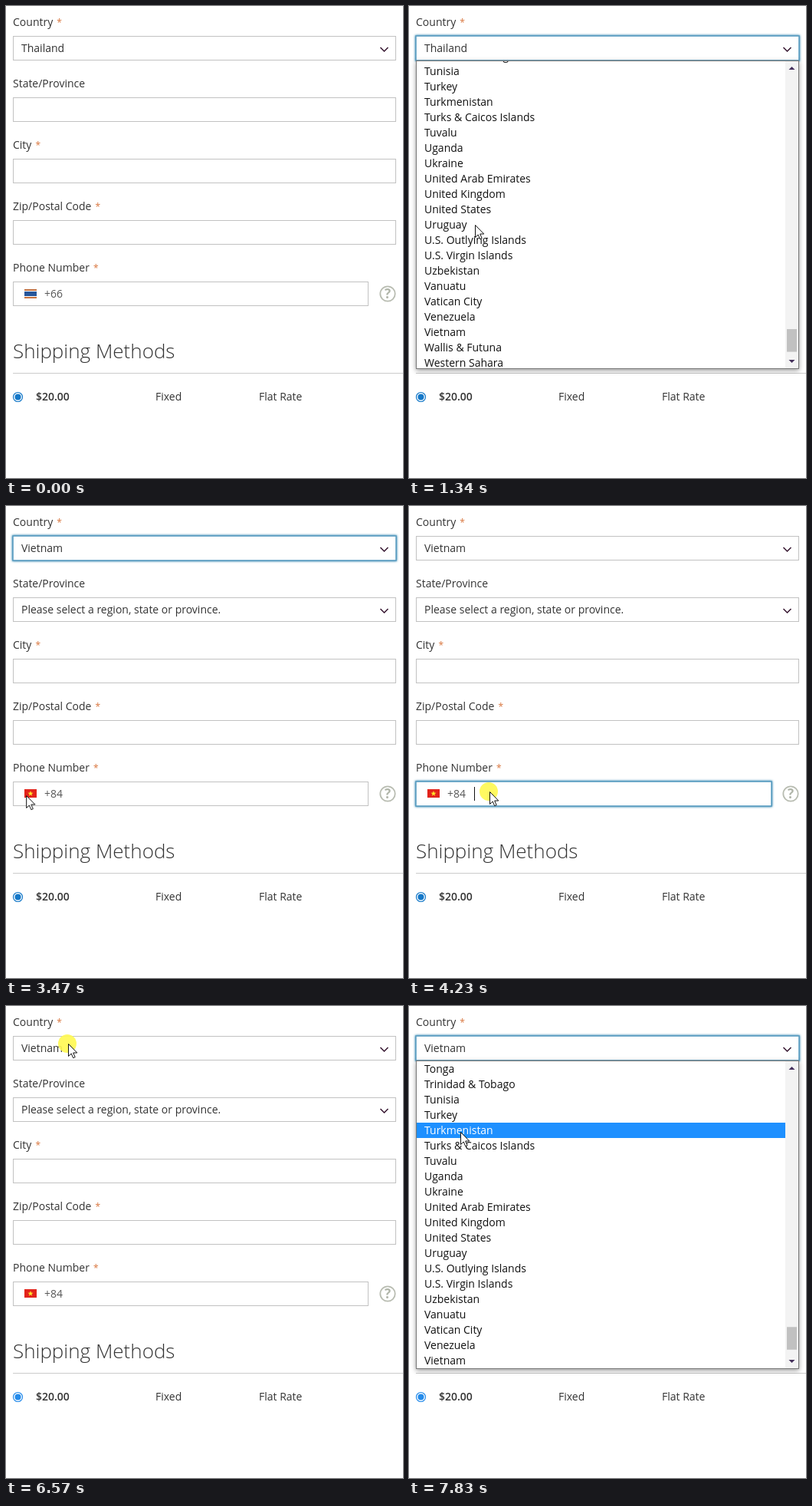
Recreate the animation shown at these times as an HTML page. Size 518 by 615 pixels, loop 8000 ms.

```html
<!DOCTYPE html>
<html lang="en">
<head>
<meta charset="utf-8">
<title>Shipping address form</title>
<style>
@property --scroll { syntax: "<number>"; inherits: true; initial-value: 0; }
@property --row { syntax: "<integer>"; inherits: true; initial-value: 19; }

html, body { margin: 0; width: 100%; height: 100%; overflow: hidden; background: #fff; }
svg { display: block; }
text { font: 14px "Open Sans", "Noto Sans", sans-serif; fill: #333; white-space: pre; }
.star { font-size: 12px; fill: #d9763f; }
.field { fill: #fff; stroke: #c2c2c2; }
.chevron { fill: none; stroke: #35152f; stroke-width: 1.5; }
.focus { fill: #fff; stroke: #5b9dc1; stroke-width: 1.6; filter: drop-shadow(0 0 1.5px #00699d); }
.dial { fill: #575757; }
.title { font-size: 26px; font-weight: 300; }
.price { font-weight: 600; }

.step { animation: 8s step-end infinite; }
.before { animation-name: before; }
.after { animation-name: after; }
.thai { animation-name: thai; }
.viet { animation-name: viet; }
.country-focus { animation-name: country-focus; }
.phone-focus { animation-name: phone-focus; }
.autofill { animation-name: autofill; }
.dot { animation-name: dot; fill: #fff94f; opacity: 0; mix-blend-mode: multiply; }
.radio { animation-name: radio; color: #1478c8; }
.caret { animation: blink 1s step-end infinite; }

.dropdown { animation: dropdown 8s step-end infinite, hover 8s step-end infinite, scroll 8s linear infinite; }
.list { transform: translateY(calc(var(--scroll) * -1px)); }
.thumb { fill: #c1c1c1; transform: translateY(calc(var(--scroll) * .0745px)); }
.bar { transform: translateY(calc(var(--row) * 20px)); }
.bar-text { transform: translateY(calc(var(--row) * -20px)); }
.list text { fill: #111; }
.list .bar-text text { fill: #fff; }
.panel { fill: #fff; stroke: #777; filter: drop-shadow(0 2px 3px #0006); }

.sheet { fill: #fff; stroke: #d4d4d4; filter: drop-shadow(0 1px 2px #0004); }
.autofill text { font-size: 11.2px; fill: #26282c; }
.autofill .number { font-size: 12.5px; font-weight: 600; }
.autofill .manage { font-size: 12.2px; }

.cursor { animation: move 8s linear infinite, appear 8s step-end infinite; }
.cursor path { fill: #fff; stroke: #111; stroke-linejoin: round; }

@keyframes before { 0% { opacity: 1 } 27.75%, 100% { opacity: 0 } }
@keyframes after { 0% { opacity: 0 } 27.75%, 100% { opacity: 1 } }
@keyframes thai { 0% { opacity: 1 } 28.75%, 100% { opacity: 0 } }
@keyframes viet { 0% { opacity: 0 } 28.75%, 100% { opacity: 1 } }
@keyframes country-focus { 0% { opacity: 0 } 10.25% { opacity: 1 } 51.9% { opacity: 0 } 83.125%, 100% { opacity: 1 } }
@keyframes phone-focus { 0% { opacity: 0 } 51.9% { opacity: 1 } 68.75%, 100% { opacity: 0 } }
@keyframes autofill { 0% { opacity: 0 } 53% { opacity: 1 } 68.75%, 100% { opacity: 0 } }
@keyframes dropdown { 0% { opacity: 0 } 10.25% { opacity: 1 } 27.75% { opacity: 0 } 83.125%, 100% { opacity: 1 } }
@keyframes radio { 53%, 100% { color: #258bea } }
@keyframes blink { 0% { opacity: 0 } 15% { opacity: 1 } 65%, 100% { opacity: 0 } }
@keyframes appear { 0% { opacity: 0 } .875%, 100% { opacity: 1 } }
@keyframes dot {
  0% { opacity: 0 } 9.125% { opacity: .9 } 11.25% { opacity: 0 }
  50.875% { opacity: .9 } 53% { opacity: 0 }
  66.625% { opacity: .9 } 68.75% { opacity: 0 }
  82.125% { opacity: .9 } 84.25%, 100% { opacity: 0 }
}
@keyframes scroll {
  0%, 14.5% { --scroll: 0 }
  16.75% { --scroll: 497 }
  18.75%, 50% { --scroll: 560 }
  50.01%, 100% { --scroll: 460 }
}
@keyframes hover {
  0% { --row: 19 } 11.9% { --row: 3 } 12.9% { --row: 6 } 13.9% { --row: 9 } 14.5% { --row: 10 }
  18.75% { --row: 39 } 20.75% { --row: 40 } 22.25% { --row: 41 } 23.5% { --row: 42 }
  86% { --row: 25 } 87% { --row: 27 } 88.5% { --row: 30 }
  93.25% { --row: 29 } 95% { --row: 28 } 97%, 100% { --row: 27 }
}
@keyframes move {
  0%, .875% { transform: translate(338px, 541px); animation-timing-function: ease-out }
  7.25%, 11.25% { transform: translate(82px, 49px) }
  14.5%, 16.75% { transform: translate(86px, 285px) }
  18.75%, 19.75% { transform: translate(86px, 294px) }
  24%, 34.6% { transform: translate(69px, 357px) }
  36.5% { transform: translate(111px, 326px) }
  38.5% { transform: translate(60px, 375px) }
  40% { transform: translate(22px, 382px) }
  41.25%, 42.4% { transform: translate(22px, 371px) }
  43.375% { transform: translate(26px, 377px) }
  49.125%, 55% { transform: translate(105px, 372px) }
  60.6% { transform: translate(88px, 368px) }
  64.5%, 68.75% { transform: translate(35px, 402px) }
  74.4%, 77.25% { transform: translate(87px, 122px) }
  80.1%, 84.25% { transform: translate(81px, 49px) }
  89.1%, 91% { transform: translate(75px, 222px) }
  97.875%, 100% { transform: translate(67px, 164px) }
}
</style>
</head>
<body>
<svg width="518" height="615" viewBox="0 0 518 615">
  <defs>
    <path id="chevron" class="chevron" d="M488.500 54l5 5 5-5"/>
  </defs>

  <g id="labels"></g>

  <rect class="field" x="9.500" y="39.500" width="499" height="31"/>
  <rect class="focus step country-focus" x="9" y="39" width="500" height="32"/>
  <text class="step before" x="20" y="60">Thailand</text>
  <text class="step after" x="20" y="60">Vietnam</text>
  <use href="#chevron"/>

  <rect class="field" x="9.500" y="119.500" width="499" height="31"/>
  <g class="step after">
    <text x="20" y="140">Please select a region, state or province.</text>
    <use href="#chevron" y="80"/>
  </g>
  <rect class="field" x="9.500" y="199.500" width="499" height="31"/>
  <rect class="field" x="9.500" y="279.500" width="499" height="31"/>

  <rect class="field" x="9.500" y="359.500" width="463" height="31"/>
  <g class="step phone-focus">
    <rect class="focus" x="9" y="359" width="464" height="32"/>
    <path class="caret" d="M85.500 366v18" stroke="#111"/>
  </g>
  <g class="step thai">
    <path d="M24 369h16v2H24zM24 379h16v2H24z" fill="#c4713f"/>
    <path d="M24 372h16v6H24z" fill="#27569a"/>
  </g>
  <g class="step viet">
    <path d="M24 369h16v11H24z" fill="#e2231a"/>
    <path id="flag-star" fill="#ffe629"/>
  </g>
  <text class="dial step before" x="50" y="380">+66</text>
  <text class="dial step after" x="50" y="380">+84</text>
  <circle cx="498" cy="375" r="9.700" fill="none" stroke="#b9bdb2" stroke-width="1.800"/>
  <text x="498" y="381" text-anchor="middle" style="font-size:17px;font-weight:700;fill:#b0b5a9">?</text>

  <text class="title" x="9" y="459">Shipping Methods</text>
  <path d="M9 478.500h509" stroke="#ccc"/>
  <g class="step radio">
    <circle cx="15.500" cy="509.500" r="6" fill="#fff" stroke="currentColor" stroke-width="1.200"/>
    <circle cx="15.500" cy="509.500" r="4" fill="currentColor"/>
  </g>
  <text class="price" x="39" y="514">$20.00</text>
  <text x="195" y="514">Fixed</text>
  <text x="330" y="514">Flat Rate</text>

  <g class="dropdown">
    <rect class="panel" x="9.500" y="71.500" width="499" height="401"/>
    <svg x="10" y="72" width="481" height="400">
      <g class="list">
        <g class="options"></g>
        <g class="bar">
          <svg width="481" height="20">
            <rect width="481" height="20" fill="#1e90ff"/>
            <g class="bar-text options"></g>
          </svg>
        </g>
      </g>
    </svg>
    <rect x="491" y="72" width="17" height="400" fill="#f3f3f3"/>
    <rect class="thumb" x="493" y="384" width="13" height="29.500"/>
    <path d="M495.500 83l4-4 4 4zM495.500 461l4 4 4-4z" fill="#45305c"/>
  </g>

  <g class="step autofill">
    <rect class="sheet" x="7.500" y="-10" width="301" height="368"/>
    <g id="addresses"></g>
    <path d="M8 317.500h300" stroke="#dcdcdc"/>
    <text class="manage" x="20" y="343">Manage addresses...</text>
  </g>

  <g class="cursor">
    <circle class="dot step" cx="-1" cy="0" r="12"/>
    <path d="M.5.5V16.500L4.200 13 6.700 18.700 9.200 17.600 6.700 12H11.800Z"/>
  </g>
</svg>
<script>
const countries = `Spain|Sri Lanka|St. Barthélemy|St. Helena|St. Kitts & Nevis|St. Lucia|St. Martin|
St. Pierre & Miquelon|St. Vincent & Grenadines|Sudan|Suriname|Svalbard & Jan Mayen|Swaziland|Sweden|
Switzerland|Syria|Taiwan|Tajikistan|Tanzania|Thailand|Timor-Leste|Togo|Tokelau|Tonga|Trinidad & Tobago|
Tunisia|Turkey|Turkmenistan|Turks & Caicos Islands|Tuvalu|Uganda|Ukraine|United Arab Emirates|
United Kingdom|United States|Uruguay|U.S. Outlying Islands|U.S. Virgin Islands|Uzbekistan|Vanuatu|
Vatican City|Venezuela|Vietnam|Wallis & Futuna|Western Sahara|Yemen|Zambia|Zimbabwe`
  .split("|").map(name => name.trim());

const addresses = [
  ["", "8 Orlune Lane"],
  ["0005550142", "718 Mây Sương Tím, Quận Gió Lành"],
  ["0005550142", "Khoi Vuu, 718 Mây Sương Tím, Quan Suoi Non"],
  ["00055501638", "47 Lua vang non"],
  ["5550100147", "2807 Misty Clover Avenue"],
  ["0005550142", "Khoi Vuu, 718 Mây Sương Tím, Quận Lá Biếc"],
];

function addText(parent, x, y, content, className = "", tag = "text") {
  const node = document.createElementNS("http://www.w3.org/2000/svg", tag);
  node.setAttribute(tag === "tspan" ? "dx" : "x", x);
  if (y !== null) node.setAttribute("y", y);
  if (className) node.setAttribute("class", className);
  node.textContent = content;
  return parent.appendChild(node);
}

const byId = id => document.getElementById(id);

["Country", "State/Province", "City", "Zip/Postal Code", "Phone Number"].forEach((label, i) => {
  const node = addText(byId("labels"), 9, 26 + i * 80, label);
  if (i !== 1) addText(node, 5, null, "*", "star", "tspan");
});

document.querySelectorAll(".options").forEach(group =>
  countries.forEach((name, i) => addText(group, 10, i * 20 + 15, name)));

addresses.forEach(([number, street], i) => {
  addText(byId("addresses"), 20, i * 58 - 16, number, "number");
  addText(byId("addresses"), 20, i * 58 + 5, street);
});

const starPoints = Array.from({ length: 10 }, (_, i) => {
  const radius = i % 2 ? 1.5 : 3.8, angle = i * Math.PI / 5;
  return [32 + radius * Math.sin(angle), 374.8 - radius * Math.cos(angle)];
});
byId("flag-star").setAttribute("d", `M${starPoints.join("L")}Z`);
</script>
</body>
</html>
```
